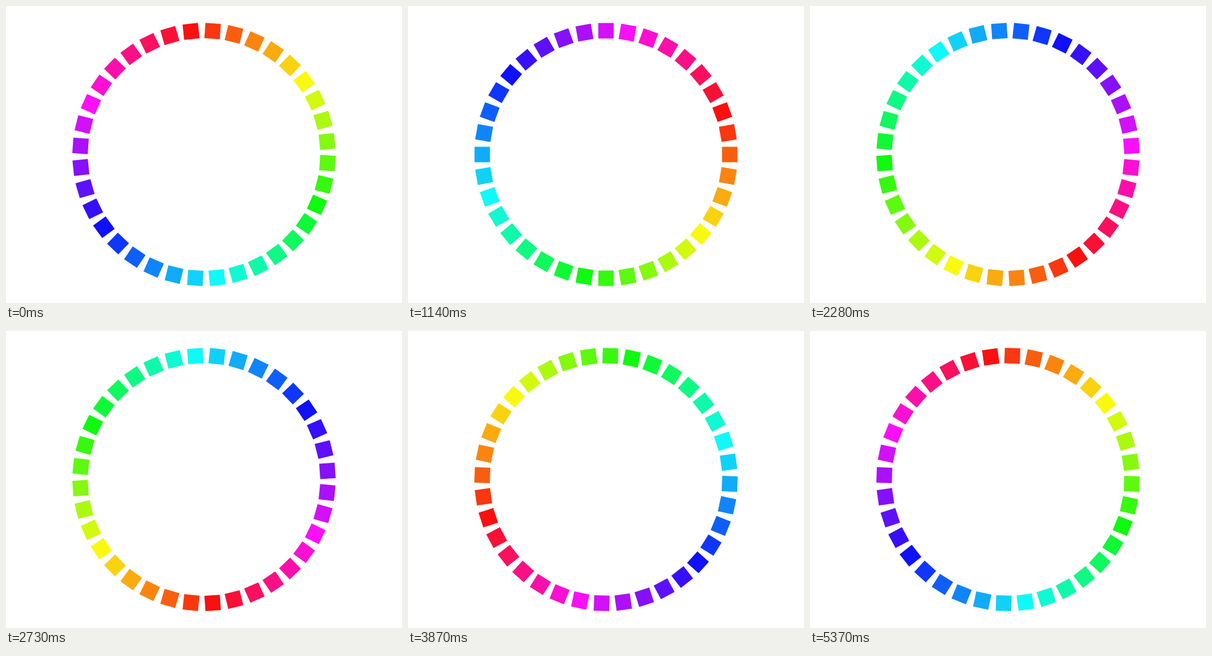
Write an HTML page with a canvas that moves like this. It is 640x480 px and loops after 5.4 s.

```html
<!DOCTYPE html>
<html lang="en">
<head>
<meta charset="utf-8">
<title>Colour ring</title>
<style>
  html, body { margin: 0; width: 100%; height: 100%; overflow: hidden; background: #fff; }
  canvas { display: block; }
</style>
</head>
<body>
<canvas width="640" height="480"></canvas>
<script>
const ctx = document.querySelector('canvas').getContext('2d');
const COUNT = 36, RADIUS = 200, SIZE = 25;
const LOOP = 5400, STEP = 30, DEG = Math.PI / 180;

function draw(time) {
  // The ring turns 2 degrees clockwise at each step.
  const turn = Math.floor((time % LOOP) / STEP) * 2 - 6;
  ctx.clearRect(0, 0, 640, 480);
  for (let i = 0; i < COUNT; i++) {
    const hue = i * 360 / COUNT;
    ctx.save();
    ctx.translate(320, 240);
    ctx.rotate((turn + hue) * DEG);
    ctx.fillStyle = `hsl(${hue}, 95%, 52%)`;
    ctx.fillRect(-SIZE / 2, -RADIUS - SIZE / 2, SIZE, SIZE);
    ctx.restore();
  }
}

const start = performance.now();
function tick() {
  draw(performance.now() - start);
  requestAnimationFrame(tick);
}
tick();
</script>
</body>
</html>
```
